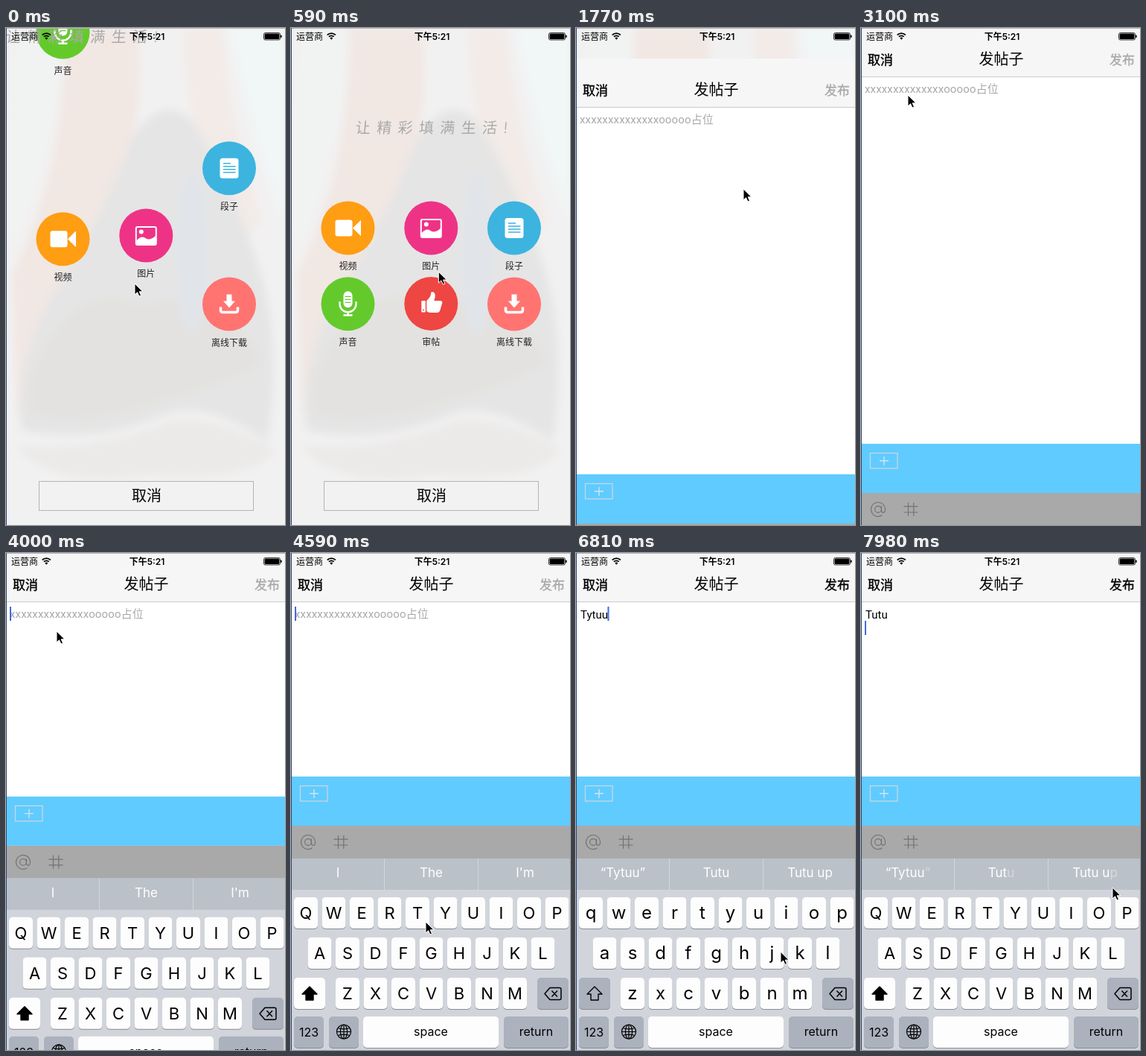
Animation of 375 by 667 pixels, one loop 8 s. Source, as an HTML page:

```html
<!DOCTYPE html>
<html lang="zh-CN">
<head>
<meta charset="utf-8">
<title>发帖子</title>
<style>
html, body { margin: 0; width: 100%; height: 100%; overflow: hidden; background: #fff; }
svg { display: block; }
#stage { width: 375px; height: 667px; }
text { font-family: Inter, 'Noto Sans CJK SC', 'Noto Sans CJK', sans-serif; white-space: pre; }
.field { font-family: Roboto, 'Noto Sans CJK SC', 'Noto Sans CJK', sans-serif; font-size: 15px; }
.slogan { font-size: 20px; letter-spacing: 8.4px; fill: #a9a9a9; font-weight: 300; }
.medium { font-weight: 500; stroke-width: .35px; }
.line { fill: none; }
</style>
</head>
<body>
<svg id="stage" viewBox="0 0 375 667" xmlns="http://www.w3.org/2000/svg">
  <defs>
    <filter id="soft" x="-10%" y="-10%" width="120%" height="120%"><feGaussianBlur stdDeviation="6"/></filter>
  </defs>
  <rect width="375" height="667" fill="#f2f1f1"/>
  <g filter="url(#soft)">
    <path d="M20 0H82Q75 130 5 300V120Z" fill="#f1f3f3"/>
    <path d="M78 0H176Q190 110 150 230Q110 380 15 520L8 330Q82 190 78 0Z" fill="#f1e7e3"/>
    <path d="M238 0H290Q300 130 345 260L300 300Q240 130 238 0Z" fill="#f2ebe8"/>
    <path d="M300 0H375V260Q330 150 300 0Z" fill="#f1f6f7"/>
    <path d="M168 150Q210 85 250 125Q300 200 340 320Q372 420 352 555Q270 500 215 518Q120 560 20 540Q10 430 80 330Q140 230 168 150Z" fill="#e5e5e5"/>
    <path d="M30 470Q90 330 180 370Q300 340 345 450Q300 480 215 500Q110 540 30 520Z" fill="#e3e2e0"/>
    <ellipse cx="250" cy="300" rx="22" ry="110" fill="#e1e4e9"/>
    <path d="M12 560Q110 570 215 530Q270 515 362 565Q340 610 190 600Q60 620 12 560Z" fill="#ebeae9"/>
  </g>
  <g id="scene"></g>
</svg>
<script>
const LOOP = 8000, TICK = 147.9, H = 667, LAST = 54;
const scene = document.getElementById('scene');
const pen = document.createElement('canvas').getContext('2d');

// ---- helpers ----
const rect = (x, y, w, h, fill, rx = 0, more = '') =>
  `<rect x="${x}" y="${y}" width="${w}" height="${h}" rx="${rx}" fill="${fill}" ${more}/>`;
const path = (d, fill, more = '') => `<path d="${d}" fill="${fill}" ${more}/>`;
const stroke = (d, color, w, more = '') => path(d, 'none', `stroke="${color}" stroke-width="${w}" ${more}`);
const dot = (x, y, r, fill, more = '') => `<circle cx="${x}" cy="${y}" r="${r}" fill="${fill}" ${more}/>`;
const group = (x, y, body) => `<g transform="translate(${x.toFixed(2)} ${y.toFixed(2)})">${body}</g>`;
const text = (s, x, mid, size, fill = '#000', more = 'text-anchor="middle"') =>
  `<text x="${x}" y="${mid + size * .37}" font-size="${size}" fill="${fill}" stroke="${fill}" stroke-width="0" ${more}>${s}</text>`;
const latest = (list, k) => list.filter(e => e[0] <= k).pop();

// under-damped drop from one screen above, and a critically damped slide
function drop(t) {
  if (t <= 0) return -H;
  const x = 17 * t;
  return -H * Math.exp(-.76 * x) * (Math.cos(.65 * x) + 1.169 * Math.sin(.65 * x));
}
function slide(t) {
  if (t <= 0) return 1;
  const x = 18 * t;
  return (1 + x) * Math.exp(-x);
}

// ---- menu page ----
const icons = {
  video: () => rect(-17, -11, 23, 22, '#fff', 3) + path('M7 0L17 -10V10Z', '#fff', 'stroke="#fff" stroke-linejoin="round"'),
  picture: () => rect(-13.5, -11.5, 27, 24, 'none', 2, 'stroke="#fff" stroke-width="2"') +
    dot(-6.5, -5, 3, '#fff') + path('M-13 7Q-6 -1 0 4Q6 7 13 0V12H-13Z', '#fff'),
  words: c => rect(-12.5, -13.5, 25, 27, '#fff', 3.5) +
    stroke('M-8 -6.5H2M-8 -2.5H8.5M-8 1.5H8.5M-8 5.5H8.5', c, 1.6),
  audio: c => rect(-6, -17, 12, 22, '#fff', 6) + stroke('M-4 -10H4M-4 -6H4M-4 -2H4', c, 1.4) +
    stroke('M-11 -3V0A11 11 0 0 0 11 0V-3M0 11V15M-6 15.2H6', '#fff', 2.4),
  review: c => rect(-13, -4, 5.5, 15.5, '#fff', 1) + dot(-10.3, 8.5, 1, c) +
    path('M-6 -4Q0 -9 0 -15.5Q5 -17 5.5 -11Q5.5 -8 4 -4H12Q15.5 -4 15 -1L12 9Q11 12 8 12H-1Q-4 12 -6 10Z', '#fff'),
  offline: () => path('M-3.5 -13H3.5V-4H8L0 5L-8 -4H-3.5Z', '#fff') +
    stroke('M-11.5 4V8Q-11.5 11 -8.5 11H8.5Q11.5 11 11.5 8V4', '#fff', 3.5)
};
// icon, label, colour, column, row, start of drop in seconds
const buttons = [
  ['video', '视频', '#ff9d13', 76.5, 268.5, -.32],
  ['picture', '图片', '#ee3387', 188.3, 268.5, -.24],
  ['words', '段子', '#3cb4df', 300, 268.5, -.16],
  ['audio', '声音', '#64ca2c', 76.5, 370.5, -.08],
  ['review', '审帖', '#ee4643', 188.3, 370.5, 0],
  ['offline', '离线下载', '#ff7471', 300, 370.5, -.5]
];
const SLOGAN_START = .08;

function menu(k, s) {
  const items = buttons.map(([name, label, color, x, y, start]) => {
    const shade = name === 'words' && k === 10 ? dot(0, 0, 36, '#000', 'opacity=".47"') : '';
    return group(x, y + drop(s - start),
      dot(0, 0, 36, color) + icons[name](color) + shade + text(label, 0, 51.5, 12, '#222'));
  }).join('');
  const waiting = s < SLOGAN_START;
  const slogan = group(waiting ? 0 : 87, waiting ? 11 : 134 + drop(s - SLOGAN_START),
    '<text class="slogan" y="7.5" transform="skewX(-5)">让精彩填满生活!</text>');
  return items + slogan +
    rect(44.5, 608.5, 288, 39, '#f2f2f2', 0, 'stroke="#b4b4b4"') +
    text('取消', 189, 628, 20, '#000', 'text-anchor="middle" font-weight="300"');
}

// ---- keyboard ----
const GREY = '#abb1bd';
const rows = [['QWERTYUIOP', 4, 462], ['ASDFGHJKL', 22.5, 516], ['ZXCVBNM', 60, 570]];
const presses = { 34: 'T', 37: 'y', 39: 't', 42: 'u', 44: 'u' };
const typed = [[0, ''], [35, 'T'], [38, 'Ty'], [40, 'Tyt'], [43, 'Tytu'], [45, 'Tytuu'], [54, 'Tutu']];
const hints = {
  '': ['I', 'The', 'I\'m'],
  T: ['“T”', 'The', 'This'],
  Ty: ['“Ty”', 'Typical', 'Typically'],
  Tyt: ['“Tyt”', 'Try', 'Title'],
  Tytu: ['“Tytu”', 'Tutu', 'Tutus'],
  Tytuu: ['“Tytuu”', 'Tutu', 'Tutu up']
};
hints.Tutu = hints.Tytuu.map(h => `${h.slice(0, -1)}<tspan fill-opacity=".4">${h.slice(-1)}</tspan>`);

const keycap = (x, y, w, fill = '#fdfdfd') =>
  rect(x, y + 1, w, 42, '#898c92', 5) + rect(x, y, w, 42, fill, 5);
const letter = (s, x, base, size) =>
  `<text x="${x}" y="${base}" font-size="${size}" text-anchor="middle">${s}</text>`;

function balloon(char, cx) {
  return group(cx, 0,
    path('M-28.5 407a10 10 0 0 1 10 -10h37a10 10 0 0 1 10 10V436C28.5 450 16 450 16 464V499a5 5 0 0 1 -5 5' +
      'H-11a5 5 0 0 1 -5 -5V464C-16 450 -28.5 450 -28.5 436Z', '#fdfdfd', 'stroke="#a5a9b0" stroke-width=".5"') +
    letter(char, 0, 439, 36));
}

function keyboard(k, word) {
  const upper = k < 35 || k === LAST;
  let out = rect(0, 410, 375, 258, '#d1d5db') + rect(0, 410, 375, 42, '#bac1c9') +
    stroke('M125.5 410V452M251.5 410V452', '#d3d7dc', 1);
  hints[word].forEach((h, i) => out += text(h, [63, 188.5, 314.5][i], 429, 17, '#fff'));

  let top = '';
  for (const [chars, left, y] of rows) {
    [...chars].forEach((c, i) => {
      const x = left + 37.5 * i, shown = upper ? c : c.toLowerCase();
      out += keycap(x, y, 32) + letter(shown, x + 16, y + 29, upper ? 22 : 24);
      if (presses[k] === shown) top = balloon(shown, x + 16);
    });
  }
  const arrow = 'M25 582L35 592H30V600H20V592H15Z';
  out += keycap(4, 570, 42, upper ? '#fdfdfd' : GREY) +
    path(arrow, upper ? '#000' : 'none', 'stroke="#000" stroke-width="1.4" stroke-linejoin="round"');
  out += keycap(331, 570, 42, GREY) +
    stroke('M348 583.5H361Q363 583.5 363 585.5V597.5Q363 599.5 361 599.5H348L341 591.5ZM350.5 587.5L358 595.5M358 587.5L350.5 595.5',
      '#000', 1.5, 'stroke-linejoin="round"');
  out += keycap(4, 622, 40, GREY) + text('123', 24, 643, 16);
  out += keycap(51, 622, 40, GREY) + group(71, 642.5,
    dot(0, 0, 9.5, 'none', 'stroke="#000" stroke-width="1.2"') +
    '<ellipse rx="4.6" ry="9.5" fill="none" stroke="#000" stroke-width="1.2"/>' +
    stroke('M0 -9.5V9.5M-9.5 0H9.5M-7.8 -5Q0 -2.4 7.8 -5M-7.8 5Q0 2.4 7.8 5', '#000', 1.2));
  out += keycap(97, 622, 182) + text('space', 188, 642.5, 16);
  out += keycap(286, 622, 87, k === 53 ? '#fdfdfd' : GREY) + text('return', 329.5, 642.5, 16);
  return out + top;
}

// ---- post page ----
function tools(y) {
  const ink = '#727272';
  return rect(0, y - 66, 375, 66, '#60cbff') +
    rect(12.5, y - 53.5, 36.5, 20.5, 'none', 0, 'stroke="#c9d6de" stroke-width="1.3"') +
    stroke(`M25 ${y - 43.2}H37M31 ${y - 49}V${y - 37}`, '#d5e3ea', 1.4) +
    rect(0, y, 375, 44, '#a9a9a9') +
    group(23, y + 22,
      dot(0, 0, 4.4, 'none', `stroke="${ink}" stroke-width="1.1"`) +
      stroke('M4.5 -4.5V1.5Q4.5 4.5 7 4.5Q9.7 4 9.5 -.5A9.5 9.5 0 1 0 5.5 7.8', ink, 1.1)) +
    group(67, y + 22, stroke('M-3.5 -9V9M3.8 -9V9M-9.5 -3.8H9.5M-9.5 4H9.5', ink, 1.2));
}

function post(k, s) {
  const word = latest(typed, k)[1];
  const keys = 258 * slide(s - 3.78);
  const bold = 'class="medium"';
  let out = rect(0, 0, 375, H, '#fff') + rect(0, 0, 375, 65, '#f6f6f6') + rect(0, 65, 375, 1, '#cbcbcb') +
    text('取消', 9, 43, 17, '#000', bold) +
    text('发帖子', 188.5, 42, 20) +
    text('发布', 334, 43, 17, word ? '#000' : '#a9a9a9', bold);

  out += word
    ? `<text class="field" x="6" y="87.5">${word}</text>`
    : '<text class="field" x="5" y="87" fill="#a9a9a9" letter-spacing=".15">xxxxxxxxxxxxxxooooo占位</text>';

  const blinkOff = [28, 29, 50].includes(k);
  if (k >= 26 && !blinkOff) {
    pen.font = '15px Roboto, sans-serif';
    const newline = k === LAST;
    const x = word && !newline ? 5.5 + pen.measureText(word).width : 5;
    out += rect(x, newline ? 91 : 72, 2, 19, '#4568e0');
  }
  out += tools(366 + keys);
  if (s > 3.78) out += group(0, keys, keyboard(k, word));
  return out;
}

// ---- overlays ----
function statusBar() {
  return text('运营商', 7, 11.5, 12, '#000', '') +
    group(54.3, 15,
      stroke('M-5.6 -5.6A7.9 7.9 0 0 1 5.6 -5.6M-3.4 -3.3A4.8 4.8 0 0 1 3.4 -3.3', '#000', 1.8) +
      path('M0 .8L-2 -1.5A2.8 2.8 0 0 1 2 -1.5Z', '#000')) +
    text('下午5:21', 189.5, 11.5, 12, '#000', 'text-anchor="middle" font-weight="600"') +
    rect(346.5, 6.5, 22, 9.5, '#fff', 2, 'stroke="#000" stroke-width=".8"') +
    rect(347.6, 7.6, 19.8, 7.3, '#000', 1) + rect(369.2, 9.5, 1.5, 3.5, '#000', .7) +
    rect(0, 0, 375, 1, '#b5b5b5') + rect(0, 0, 1, H, '#304b7e');
}

// tick, x, y of the pointer tip
const route = [
  [0, 173, 343], [3, 178, 340], [9, 300, 263], [10, 300, 263], [11, 285, 250], [12, 225, 216],
  [16, 190, 184], [19, 85, 75], [21, 63, 90], [26, 63, 90], [27, 68, 105], [30, 172, 470],
  [31, 181, 495], [34, 170, 487], [35, 173, 486], [37, 206, 485], [38, 200, 485], [39, 157, 485],
  [40, 175, 487], [42, 243, 488], [45, 245, 488], [48, 335, 630], [49, 342, 638],
  [51, 342, 646], [53, 342, 646], [54, 338, 449]
];
function pointer(k) {
  const a = latest(route, k), b = route.find(p => p[0] > k) || a;
  const f = a === b ? 0 : (k - a[0]) / (b[0] - a[0]);
  return group(a[1] + (b[1] - a[1]) * f, a[2] + (b[2] - a[2]) * f,
    path('M0 0V15L3.5 11.7L6 17L8.5 16L6.2 10.8H11Z', '#000', 'stroke="#fff" stroke-width="1"'));
}

function draw(k) {
  const s = k * TICK / 1000;
  const offset = H * slide(s - 1.5248);
  const shift = offset < .5 ? 0 : Math.round(offset);
  scene.innerHTML = (shift ? menu(k, s) : '') +
    (shift < H ? group(0, shift, post(k, s)) : '') + statusBar() + pointer(k);
}

const begin = performance.now();
let shown = -1;
function frame() {
  const t = (performance.now() - begin) % LOOP;
  const k = Math.min(LAST, Math.floor((t + 8) / TICK));
  if (k !== shown) draw(shown = k);
  requestAnimationFrame(frame);
}
frame();
</script>
</body>
</html>
```
